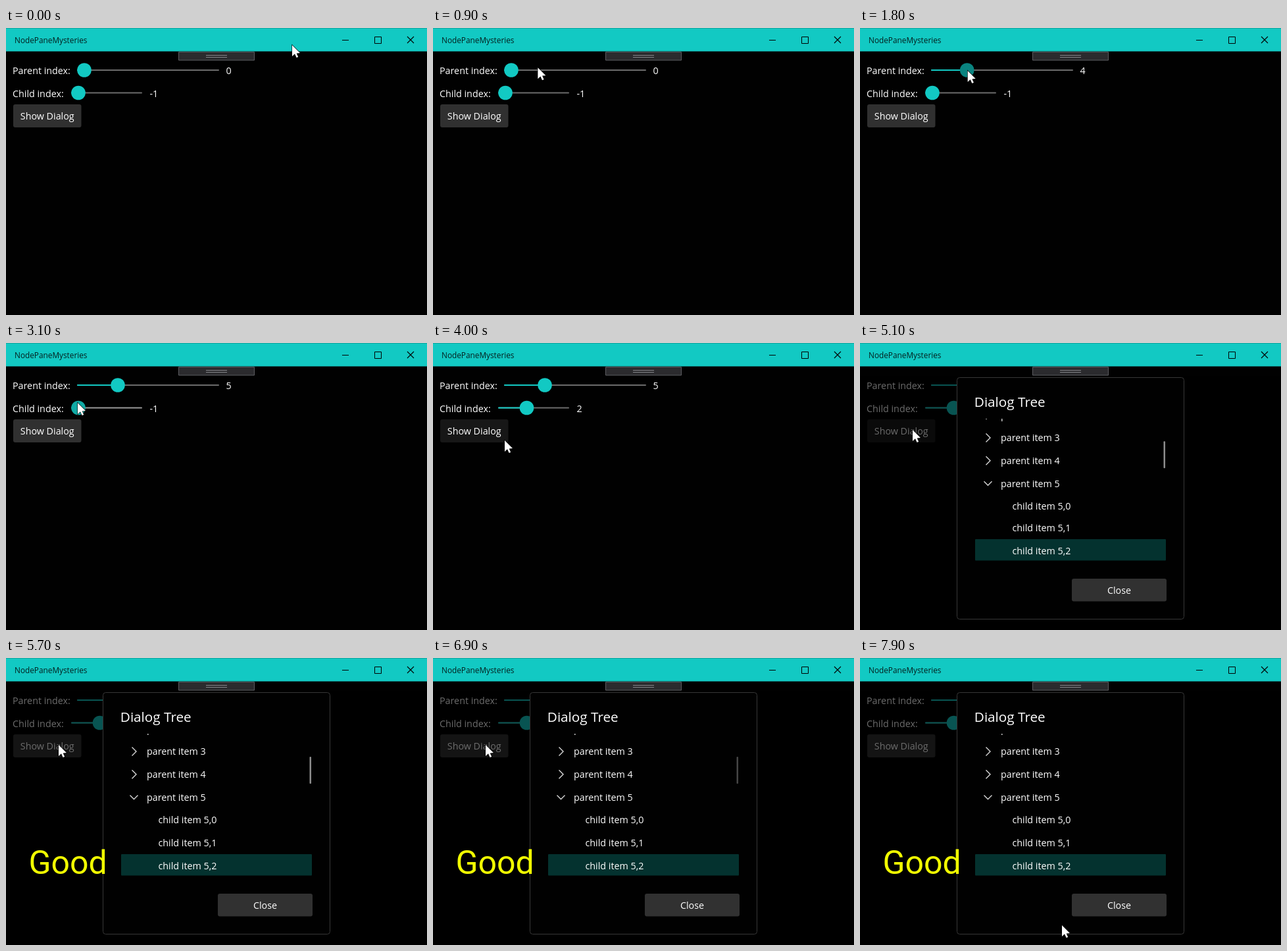
Write an HTML page with a canvas that moves like this. It is 640x436 px and loops after 8 s.

```html
<!DOCTYPE html>
<html lang="en">
<head>
<meta charset="utf-8">
<title>Tree dialog demo</title>
<style>
  html, body { margin: 0; width: 100%; height: 100%; overflow: hidden; background: #000; }
  canvas { display: block; }
</style>
</head>
<body>
<canvas id="stage" width="640" height="436"></canvas>
<script>
const ctx = document.getElementById('stage').getContext('2d');
const LOOP = 8000, STEP = 100, ROW = 34.7;
const TEAL = '#12c9c3', HOVER = '#10aaa5', PRESSED = '#0a8480', TRACK = '#6c6c6c';
const UI_FONT = '"Open Sans", "Noto Sans"';

const pointerHome = { x: 435, y: 26 };
const moves = [
  { from: 200, to: 1000, x: 120, y: 65 },
  { from: 1200, to: 1900, x: 171, y: 65 },
  { from: 2000, to: 2800, x: 109, y: 91 },
  { from: 3200, to: 3600, x: 142, y: 93 },
  { from: 3600, to: 4000, x: 109, y: 148 },
  { from: 4000, to: 4400, x: 80, y: 132 },
  { from: 7300, to: 7900, x: 307, y: 406, bend: { x: -25, y: 410 } }
];

const ramp = (t, from, to) => Math.max(0, Math.min(1, (t - from) / (to - from)));
const during = (t, from, to) => t >= from && t < to;
const bezier = (a, b, c, p) => a * (1 - p) ** 2 + 2 * b * p * (1 - p) + c * p * p;

function pointerAt(t) {
  return moves.reduce((pos, move) => {
    const p = ramp(t, move.from, move.to);
    const bend = move.bend || { x: (pos.x + move.x) / 2, y: (pos.y + move.y) / 2 };
    return { x: bezier(pos.x, bend.x, move.x, p), y: bezier(pos.y, bend.y, move.y, p) };
  }, pointerHome);
}

function rect(x, y, w, h, color, radius = 0, border) {
  ctx.beginPath();
  ctx.roundRect(x, y, w, h, radius);
  ctx.fillStyle = color;
  ctx.fill();
  if (border) {
    ctx.strokeStyle = border;
    ctx.lineWidth = 1;
    ctx.stroke();
  }
}

function text(str, x, y, { size = 14.3, color = '#fff', align = 'left', font = UI_FONT } = {}) {
  ctx.font = `${size}px ${font}, sans-serif`;
  ctx.textAlign = align;
  ctx.fillStyle = color;
  ctx.fillText(str, x, y);
}

function path(d, x, y, stroke, width = 1, fill) {
  const shape = new Path2D(d);
  ctx.save();
  ctx.translate(x, y);
  ctx.strokeStyle = stroke;
  ctx.lineWidth = width;
  ctx.stroke(shape);
  if (fill) {
    ctx.fillStyle = fill;
    ctx.fill(shape);
  }
  ctx.restore();
}

function button(label, x, y, w, h, color) {
  rect(x, y, w, h, color, 3);
  text(label, x + w / 2, y + 23, { align: 'center' });
}

function slider(left, right, y, x, thumb, track) {
  rect(left, y - 1, right - left, 2, track, 1);
  rect(left, y - 1, x - left, 2, TEAL, 1);
  ctx.beginPath();
  ctx.arc(x, y, 10.8, 0, 2 * Math.PI);
  ctx.fillStyle = thumb;
  ctx.fill();
}

function drawTitleBar() {
  rect(0, 0, 640, 35.5, TEAL);
  rect(0, 0, 640, 1, '#0fa5a0');
  text('NodePaneMysteries', 13, 23, { size: 11.8, color: '#041f1e' });
  path('M-5 0H5', 516, 18.5, '#000');
  path('M-5-5H5V5H-5Z', 565.5, 18.5, '#000');
  path('M-5-5L5 5M5-5L-5 5', 615, 18, '#000', 1.1);
}

function drawHandle() {
  rect(262.5, 36.5, 115, 12.5, '#2b2b2e', 0, '#5b5c60');
  for (const y of [41, 44]) rect(304, y, 32, 1, '#85868a');
}

function drawForm(t) {
  const parentX = 119 + 51 * ramp(t, 1200, 1900);
  const childX = 110 + 32.5 * ramp(t, 3200, 3600);

  text('Parent index:', 10, 70);
  const parentThumb = during(t, 1100, 2000) ? PRESSED : during(t, 1000, 2200) ? HOVER : TEAL;
  slider(108, 324, 64, parentX, parentThumb, TRACK);
  text(Math.round((parentX - 119) / 10.2), 334.5, 70);

  text('Child index:', 10, 105);
  const childThumb = during(t, 3200, 3700) ? PRESSED : during(t, 2800, 3800) ? HOVER : TEAL;
  slider(99, 207, 98.5, childX, childThumb, during(t, 2700, 3800) ? '#999' : TRACK);
  text(Math.round((childX - 110) / 10.75) - 1, 218.5, 105);

  button('Show Dialog', 11, 116, 103.5, 35, during(t, 4000, 5300) ? '#171717' : '#303030');
}

function drawTree(t) {
  const rest = 95 * (1 - ramp(t, 4700, 5500)) ** 5.6;
  ctx.save();
  ctx.beginPath();
  ctx.rect(174, 115, 292, 216);
  ctx.clip();
  for (let i = 0; i < 6; i++) {
    const y = 142 + (i - 3) * ROW + rest;
    text('parent item ' + i, 214, y + 5.3);
    path(i === 5 ? 'M-6-3L0 3 6-3' : 'M-3-6.5L3.5 0-3 6.5', 194.5, y, '#d8d8d8', 1.4);
  }
  for (let i = 0; i < 3; i++) {
    const y = 246 + i * ROW + (i ? Math.max(0, rest - 2) : rest);
    if (i === 2) rect(175, y - 17.4, 290, 32.5, '#04322f', 1);
    text('child item 5,' + i, 231.5, y + 5.3);
  }
  ctx.restore();
  const glow = 0.55 * ramp(t, 7000, 6800);
  rect(461.5, 150 - rest * 0.35, 2.5, 41, `rgba(255,255,255,${glow})`, 1);
}

function drawDialog(t) {
  ctx.globalAlpha = ramp(t, 4500, 4900);
  rect(0, 50, 640, 386, 'rgba(0,0,0,.58)');
  rect(147.5, 52.5, 345, 367, '#010101', 4, '#373737');
  text('Dialog Tree', 173.8, 96.5, { size: 20.7 });
  drawTree(t);
  button('Close', 322, 358, 144, 34.5, '#313131');
  ctx.globalAlpha = 1;
}

function drawPointer({ x, y }) {
  path('M0 0V17L4 13.3 6.6 19 9.2 18 6.7 12.4 12 12Z', x, y, '#000', 1.2, '#fff');
}

function draw(t) {
  rect(0, 0, 640, 436, '#010101');
  drawForm(t);
  if (t >= 4600) drawDialog(t);
  if (t >= 5700) text('Good', 34.4, 328, { size: 50, color: '#f2ff00', font: 'Roboto' });
  drawTitleBar();
  drawHandle();
  drawPointer(pointerAt(t));
}

const start = performance.now();
function tick() {
  const t = (performance.now() - start) % LOOP;
  draw(Math.floor(t / STEP) * STEP);
  requestAnimationFrame(tick);
}
tick();
</script>
</body>
</html>
```
